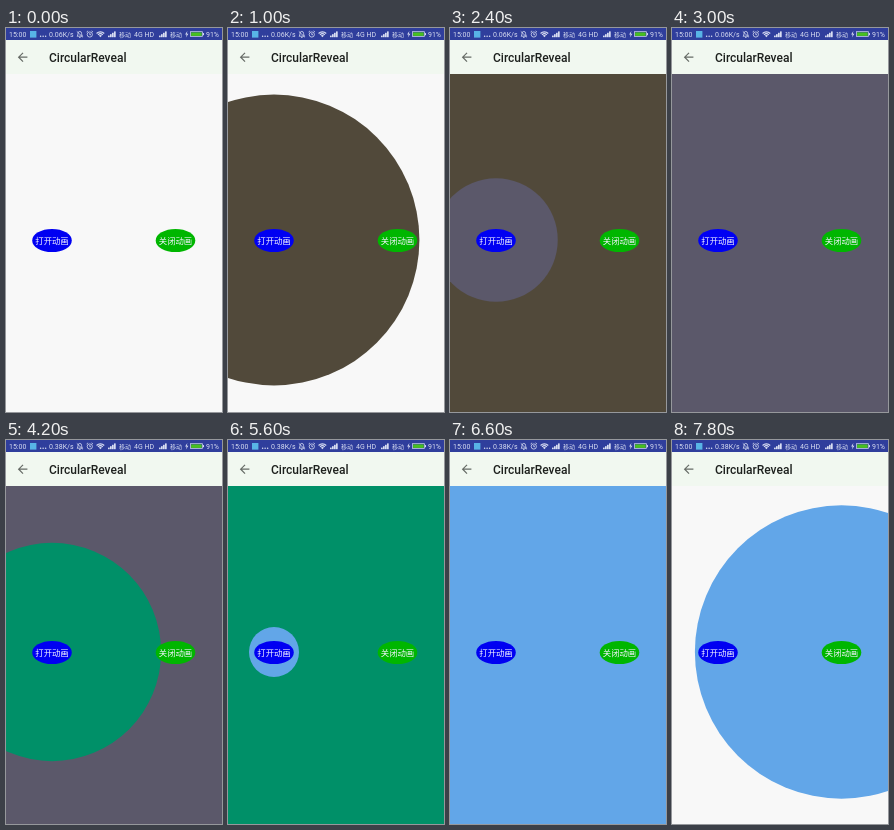
These frames come from a looping animation (216 by 384 pixels, 8000 ms). An HTML page with a canvas:

```html
<!DOCTYPE html>
<html lang="zh">
<head>
<meta charset="utf-8">
<title>CircularReveal</title>
<style>
html, body { margin: 0; width: 100%; height: 100%; overflow: hidden; background: #f8f8f8; }
canvas { display: block; width: 216px; height: 384px; }
</style>
</head>
<body>
<canvas id="stage"></canvas>
<script>
const W = 216, H = 384, TOP = 46, LOOP = 8000, STEP = 200;
const DURATION = 1500, REACH = Math.hypot(W, H - TOP);
const SANS = 'Roboto, "Noto Sans CJK SC", "Noto Sans CJK", sans-serif';
const CJK = '"Noto Sans CJK SC", "Noto Sans CJK", sans-serif';
const PAPER = '#f8f8f8', INK = '#d9def2';

const OPEN = { x: 46, y: 212.5, color: '#0000f2', label: '打开动画' };
const CLOSE = { x: 169.5, y: 212.5, color: '#00b600', label: '关闭动画' };
const REVEALS = [
  { start: 383, color: '#51493a' },
  { start: 2015, color: '#5b586a' },
  { start: 3676, color: '#009068' },
  { start: 5359, color: '#62a6e8' }
];
const HIDE_START = 6920, SPEED_CHANGE = 3400;

const canvas = document.getElementById('stage');
const ctx = canvas.getContext('2d');
const dpr = window.devicePixelRatio || 1;
canvas.width = W * dpr;
canvas.height = H * dpr;

const arrow = new Path2D('M20 11H7.83l5.59-5.59L12 4l-8 8 8 8 1.41-1.41L7.83 13H20v-2z');

// Accelerate, then decelerate
function progress(t, start) {
  const x = Math.min(1, Math.max(0, (t - start) / DURATION));
  return 0.5 - Math.cos(x * Math.PI) / 2;
}

function rect(x, y, w, h, color) {
  ctx.fillStyle = color;
  ctx.fillRect(x, y, w, h);
}

function oval(x, y, rx, ry, color) {
  ctx.fillStyle = color;
  ctx.beginPath();
  ctx.ellipse(x, y, rx, ry, 0, 0, Math.PI * 2);
  ctx.fill();
}

function text(str, x, y, font, color, align = 'left') {
  ctx.font = font;
  ctx.fillStyle = color;
  ctx.textAlign = align;
  ctx.fillText(str, x, y);
}

function line(path) {
  ctx.stroke(new Path2D(path));
}

function fill(path, color) {
  ctx.fillStyle = color;
  ctx.fill(new Path2D(path));
}

function signal(x) {
  for (let i = 0; i < 4; i++) {
    const h = 1.6 + i * 1.4;
    rect(x + i * 2, 9.2 - h, 1.7, h, INK);
  }
}

function wifi(x, y) {
  ctx.lineWidth = 1.2;
  for (const r of [3.4, 5.4]) {
    ctx.beginPath();
    ctx.arc(x, y, r, -Math.PI * 0.75, -Math.PI * 0.25);
    ctx.stroke();
  }
  fill(`M${x} ${y} l-1.6 -1.8 q1.6 -1 3.2 0 Z`, INK);
}

function statusBar(t) {
  const label = (str, x) => text(str, x, 8.8, '7px ' + SANS, INK);
  const carrier = x => text('移动', x, 8.8, '6px ' + CJK, INK);
  rect(0, 0, W, 12, '#2f3e9c');
  label('15:00', 3);
  rect(24, 3, 6.4, 6.6, '#58b4e6');
  for (let i = 0; i < 3; i++) oval(34.6 + i * 2.5, 8.2, 0.75, 0.75, INK);
  label(t < SPEED_CHANGE ? '0.06K/s' : '0.38K/s', 43);

  ctx.strokeStyle = INK;
  ctx.lineWidth = 0.8;
  // Muted bell
  line('M71 8.2 Q72 7.4 72 5.6 Q72 3.4 73.8 3.4 Q75.6 3.4 75.6 5.6 Q75.6 7.4 76.6 8.2 Z M73 9.4 H74.6 M70.8 3.4 L76.8 9.2');
  // Alarm clock
  ctx.beginPath();
  ctx.arc(83.8, 6.5, 2.6, 0, Math.PI * 2);
  ctx.stroke();
  line('M83.8 5 V6.7 H85 M80.6 4 L82.1 2.9 M87 4 L85.5 2.9');
  wifi(94.4, 9.3);
  signal(102);
  carrier(113);
  label('4G HD', 128);
  signal(153);
  carrier(164);
  fill('M181.4 3 L179.1 6.6 H180.7 L179.9 9.4 L182.4 5.7 H180.8 Z', INK);
  ctx.lineWidth = 0.7;
  ctx.strokeRect(184.4, 3.7, 12.2, 4.9);
  rect(197, 5.1, 1, 2.1, INK);
  rect(185.1, 4.4, 10.6, 3.5, '#48c020');
  label('91%', 200);
}

function appBar() {
  rect(0, 12, W, TOP - 12, '#f1f8f0');
  ctx.save();
  ctx.translate(9.4, 22);
  ctx.scale(0.6, 0.6);
  ctx.fillStyle = '#666b66';
  ctx.fill(arrow);
  ctx.restore();
  text('CircularReveal', 43, 33.8, '500 12px ' + SANS, '#1d201d');
}

function button(b) {
  oval(b.x, b.y, 19.8, 11.6, b.color);
  text(b.label, b.x, b.y + 3.3, '8.4px ' + CJK, '#f4f4ff', 'center');
}

function content(t) {
  rect(0, TOP, W, H - TOP, PAPER);
  if (t >= HIDE_START) {
    const r = REACH * (1 - progress(t, HIDE_START));
    oval(CLOSE.x, 212, r, r, REVEALS[3].color);
  } else {
    for (const { start, color } of REVEALS) {
      const r = REACH * progress(t, start);
      if (r > 0) oval(OPEN.x, 212, r, r, color);
    }
  }
  button(OPEN);
  button(CLOSE);
}

function draw(now) {
  const t = Math.floor((now % LOOP) / STEP) * STEP;
  ctx.setTransform(dpr, 0, 0, dpr, 0, 0);
  content(t);
  appBar();
  statusBar(t);
}

const begin = performance.now();
function tick() {
  draw(performance.now() - begin);
  requestAnimationFrame(tick);
}
tick();
</script>
</body>
</html>
```
